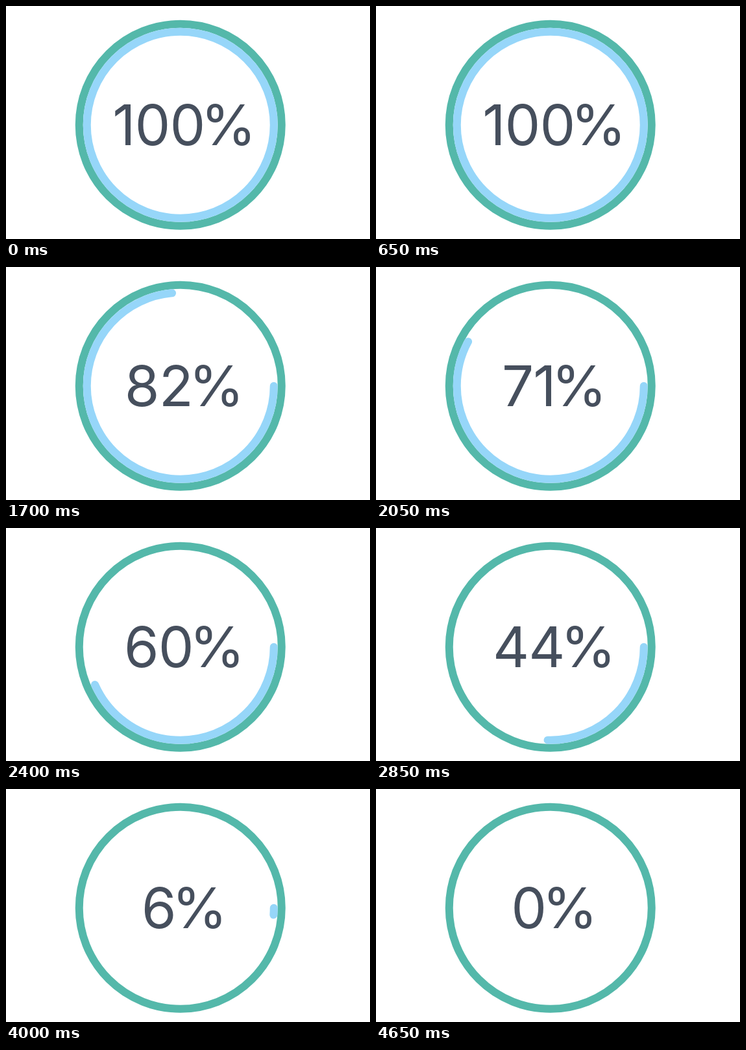
Write an HTML page without scripts that moves like this. It is 561 px wide and 360 px high and loops after 4.7 s.

```html
<!DOCTYPE html>
<html lang="en">
<head>
<meta charset="utf-8">
<title>Countdown ring</title>
<style>
@property --count { syntax: "<integer>"; inherits: true; initial-value: 100; }
@property --progress { syntax: "<number>"; inherits: true; initial-value: 0; }

html, body { margin: 0; width: 100%; height: 100%; overflow: hidden; background: #fff; }

.stage {
  position: relative;
  width: 561px;
  height: 360px;
  overflow: hidden;
  /* the tiny lead keeps each 50 ms step clear of its boundary */
  animation: countdown 4700ms -1ms infinite;
}

svg { position: absolute; inset: 0; }
circle { fill: none; stroke-width: 12; }
.track { stroke: #54b8aa; }
.arc {
  stroke: #96d6f9;
  stroke-linecap: round;
  stroke-dasharray: 360 400;
  stroke-dashoffset: calc(360.2px * sin(var(--progress) * 90deg));
}

.label {
  position: absolute;
  left: 0;
  top: 0;
  width: 538px;
  text-align: center;
  font: 400 87px/367px Inter, sans-serif;
  color: #464f5d;
  white-space: nowrap;
  counter-reset: percent var(--count);
}
.label::before {
  content: counter(percent);
  letter-spacing: -1px;
}
/* the sign sits close to the digits */
.label::after {
  content: "%";
  margin: 0 -12px 0 -6px;
}

/* one step per 50 ms */
@keyframes countdown {
  0%      { --count: 100; --progress: 0;     animation-timing-function: steps(22); }
  23.404% { --count: 100; --progress: 0;     animation-timing-function: steps(2); }
  25.532% { --count: 97;  --progress: .008;  animation-timing-function: steps(10); }
  36.170% { --count: 82;  --progress: .170;  animation-timing-function: steps(14); }
  51.064% { --count: 60;  --progress: .383;  animation-timing-function: steps(9); }
  60.638% { --count: 44;  --progress: .535;  animation-timing-function: steps(14); }
  75.532% { --count: 21;  --progress: .7555; animation-timing-function: steps(13); }
  89.362% { --count: 0;   --progress: .963;  animation-timing-function: steps(2); }
  91.489%, 100% { --count: 0; --progress: 1; }
}
</style>
</head>
<body>
<div class="stage">
  <svg width="561" height="360" viewBox="0 0 561 360">
    <circle class="track" cx="268.75" cy="183.75" r="156"/>
    <circle class="arc" cx="268.75" cy="183.75" r="144" pathLength="360"/>
  </svg>
  <div class="label"></div>
</div>
</body>
</html>
```
